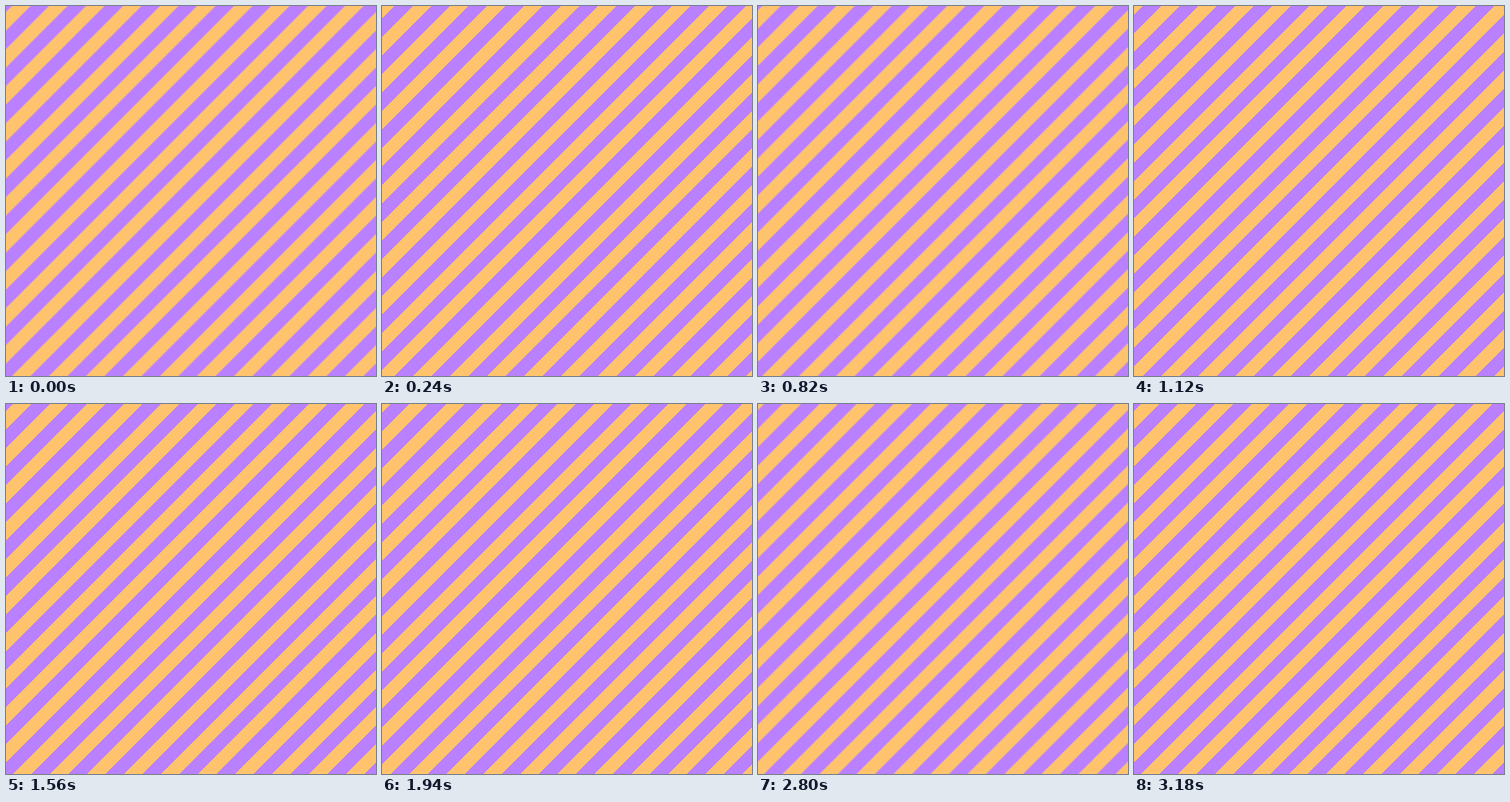
These frames come from a looping animation (400x400 px, 3.2 s). An HTML page:

```html
<!DOCTYPE html>
<html lang="en">
<head>
<meta charset="utf-8">
<title>Diagonal stripes</title>
<style>
  html, body { margin: 0; width: 100%; height: 100%; overflow: hidden; }
  #stripes {
    --stripe: #ffc36d;
    width: 100%;
    height: 100%;
    background-color: #b980ff;
    background-image: linear-gradient(135deg,
      var(--stripe) 25%, transparent 25%, transparent 50%,
      var(--stripe) 50%, var(--stripe) 75%, transparent 75%);
    background-size: 40px 40px;
  }
</style>
</head>
<body>
<div id="stripes"></div>
<script>
  const TILE = 40;
  const STEP_MS = 20;
  const LOOP_STEPS = 160;
  const START_STEP = 154;
  const PASS_STEPS = 81; // both ends of a pass are shown
  const stripes = document.getElementById("stripes");

  function draw(ms) {
    const step = (Math.floor(ms / STEP_MS) + START_STEP) % LOOP_STEPS;
    const offset = TILE - (step % PASS_STEPS) / 2;
    stripes.style.backgroundPosition = `${offset}px ${offset}px`;
  }

  const start = performance.now();
  function tick() {
    draw(performance.now() - start);
    requestAnimationFrame(tick);
  }
  draw(0);
  requestAnimationFrame(tick);
</script>
</body>
</html>
```
